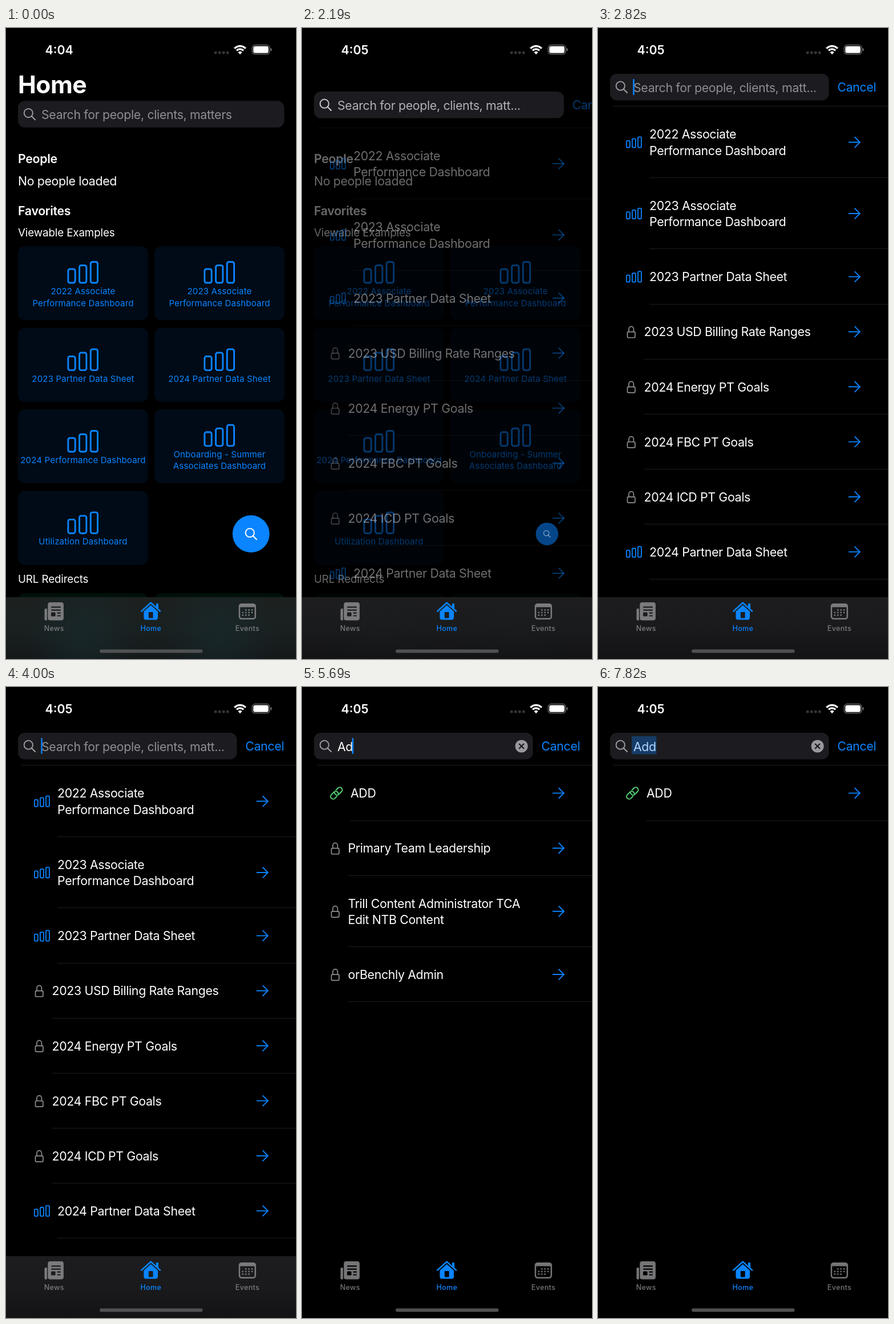
An HTML page with a canvas that plays this animation: 508 px wide and 1102 px high, repeating every 8000 ms.

```html
<!DOCTYPE html>
<html lang="en">
<head>
<meta charset="utf-8">
<title>Search</title>
<style>
html, body { margin: 0; width: 100%; height: 100%; overflow: hidden; background: #000; }
canvas { display: block; }
</style>
</head>
<body>
<canvas id="stage" width="508" height="1102"></canvas>
<script>
const ctx = document.getElementById('stage').getContext('2d');
const W = 508, H = 1102, LOOP = 8000, BAR_TOP = 994;
const BLUE = '#0a84ff', GRAY = '#8e8e93', WHITE = '#fff', GREEN = '#5bd77a';

// weight, size, letter spacing
const FONT = {
  title: [700, 42.6, -0.5],
  head: [600, 21.3, -0.3],
  clock: [600, 21.3, 0],
  body: [400, 21.3, -0.33],
  sub: [400, 18.8, -0.13],
  card: [400, 15.05, 0.15],
  tab: [500, 12.5, 0.35]
};

const CARDS = [
  ['2022 Associate', 'Performance Dashboard'], ['2023 Associate', 'Performance Dashboard'],
  ['2023 Partner Data Sheet'], ['2024 Partner Data Sheet'],
  ['2024 Performance Dashboard'], ['Onboarding - Summer', 'Associates Dashboard'],
  ['Utilization Dashboard']
];

const ROWS = [
  ['bars', '2022 Associate', 'Performance Dashboard'],
  ['bars', '2023 Associate', 'Performance Dashboard'],
  ['bars', '2023 Partner Data Sheet'],
  ['lock', '2023 USD Billing Rate Ranges'],
  ['lock', '2024 Energy PT Goals'],
  ['lock', '2024 FBC PT Goals'],
  ['lock', '2024 ICD PT Goals'],
  ['bars', '2024 Partner Data Sheet'],
  ['link', 'ADD'],
  ['lock', 'Primary Team Leadership'],
  ['lock', 'Trill Content Administrator TCA', 'Edit NTB Content'],
  ['lock', 'orBenchly Admin']
];
const TEXT_X = { bars: 90, lock: 80.5, link: 85 };

const clamp = v => Math.max(0, Math.min(1, v));
const ramp = (t, a, b) => clamp((t - a) / (b - a));

function setFont(style) {
  const [weight, size, spacing] = FONT[style];
  ctx.font = `${weight} ${size}px Inter, "Liberation Sans", sans-serif`;
  ctx.letterSpacing = spacing + 'px';
  return size;
}

// y is the middle of the capitals
function text(str, x, y, style, color = WHITE, align = 'left') {
  const size = setFont(style);
  ctx.textAlign = align;
  ctx.fillStyle = color;
  ctx.fillText(str, x, y + size * 0.364);
}

function widthOf(str, style) {
  setFont(style);
  return ctx.measureText(str).width;
}

function box(x, y, w, h, r, color) {
  ctx.fillStyle = color;
  ctx.beginPath();
  ctx.roundRect(x, y, w, h, r);
  ctx.fill();
}

function frame(x, y, w, h, r, color, lw) {
  ctx.strokeStyle = color;
  ctx.lineWidth = lw;
  ctx.beginPath();
  ctx.roundRect(x, y, w, h, r);
  ctx.stroke();
}

function disc(x, y, r, color) {
  ctx.fillStyle = color;
  ctx.beginPath();
  ctx.arc(x, y, r, 0, 7);
  ctx.fill();
}

function line(points, color, lw) {
  ctx.strokeStyle = color;
  ctx.lineWidth = lw;
  ctx.lineCap = ctx.lineJoin = 'round';
  ctx.beginPath();
  points.forEach(([x, y]) => ctx.lineTo(x, y));
  ctx.stroke();
}

function layer(alpha, draw) {
  if (alpha <= 0) return;
  ctx.save();
  ctx.globalAlpha *= alpha;
  draw();
  ctx.restore();
}

function magnifier(x, y, s, color, lw) {
  ctx.strokeStyle = color;
  ctx.lineWidth = lw;
  ctx.beginPath();
  ctx.arc(x - 2 * s, y - 2 * s, 7.6 * s, 0, 7);
  ctx.stroke();
  line([[x + 3.5 * s, y + 3.5 * s], [x + 9.7 * s, y + 9.7 * s]], color, lw * 1.1);
}

function bars(x, bottom, s, lw) {
  [27, 33.5, 39.5].forEach((h, i) => {
    const half = lw / 2;
    frame(x + i * 19.7 * s + half, bottom - h * s + half, 15.2 * s - lw, h * s - lw, 3.2 * s, BLUE, lw);
  });
}

function lock(y) {
  frame(51.5, y - 0.5, 13.4, 10.2, 2, GRAY, 1.7);
  ctx.beginPath();
  ctx.moveTo(54, y - 0.5);
  ctx.lineTo(54, y - 5.5);
  ctx.arc(58.2, y - 5.5, 4.2, Math.PI, 0);
  ctx.lineTo(62.4, y - 0.5);
  ctx.stroke();
}

function link(y) {
  ctx.save();
  ctx.translate(60.3, y);
  ctx.rotate(-Math.PI / 4);
  ctx.lineCap = 'round';
  [0, Math.PI].forEach(turn => {
    ctx.rotate(turn);
    ctx.strokeStyle = GREEN;
    ctx.lineWidth = 1.9;
    ctx.beginPath();
    ctx.moveTo(3.2, -4.4);
    ctx.lineTo(8.2, -4.4);
    ctx.arc(8.2, 0, 4.4, -Math.PI / 2, Math.PI / 2);
    ctx.lineTo(1.6, 4.4);
    ctx.arc(1.6, 0, 4.4, Math.PI / 2, Math.PI * 1.25);
    ctx.stroke();
  });
  ctx.restore();
}

function arrow(y) {
  line([[439.5, y], [458.5, y]], BLUE, 1.9);
  line([[450, y - 8.8], [458.8, y], [450, y + 8.8]], BLUE, 1.9);
}

function statusBar(t) {
  text(t < 500 ? '4:04' : '4:05', 68.5, 38, 'clock');
  for (let i = 0; i < 4; i++) box(364.7 + i * 7, 40.8, 4.8, 4.8, 1.6, '#343436');
  ctx.strokeStyle = WHITE;
  ctx.lineCap = 'butt';
  ctx.lineWidth = 3.3;
  [13.6, 8.4].forEach(r => {
    ctx.beginPath();
    ctx.arc(410, 45.2, r, -Math.PI * 0.755, -Math.PI * 0.245);
    ctx.stroke();
  });
  ctx.fillStyle = WHITE;
  ctx.beginPath();
  ctx.moveTo(410, 46.2);
  ctx.arc(410, 45.8, 5, -Math.PI * 0.755, -Math.PI * 0.245);
  ctx.fill();
  frame(431.2, 29.7, 30.6, 16, 5, '#727274', 1.3);
  box(433.2, 31.7, 26.6, 12, 3.2, WHITE);
  box(463.4, 35.2, 2, 5.4, 1, '#727274');
}

function home() {
  text('People', 21, 228, 'head');
  text('No people loaded', 21, 267, 'body');
  text('Favorites', 21, 319.5, 'head');
  text('Viewable Examples', 21, 357, 'sub');
  CARDS.forEach((lines, i) => {
    const x = i % 2 ? 260 : 21, y = 381.3 + (i >> 1) * 142.4;
    const two = lines.length > 1;
    box(x, y, 227.8, 129, 12, '#000b17');
    bars(x + 86.4, y + (two ? 65.2 : 75.4), 1, 2.9);
    lines.forEach((s, n) => text(s, x + 114, y + (two ? 78.2 : 88.4) + n * 20.6, 'card', BLUE, 'center'));
  });
  text('URL Redirects', 21, 962.5, 'sub');
  box(21, 987, 227.8, 60, 12, '#00100a');
  box(260, 987, 227.8, 60, 12, '#00100a');
}

function results(query, dy) {
  const rows = query.length < 2 ? ROWS
    : ROWS.filter(r => r.slice(1).join(' ').toLowerCase().includes(query.toLowerCase()));
  let y = 136.9 + dy;
  const divider = x => {
    ctx.fillStyle = '#1d1d1f';
    ctx.fillRect(x, Math.floor(y), W - x, 1);
  };
  divider(26);
  for (const [icon, ...lines] of rows) {
    if (y > BAR_TOP) break;
    const h = lines.length > 1 ? 124.5 : 96.1, mid = y + h / 2 + 0.4;
    if (icon === 'bars') bars(49, mid + 10.1, 0.51, 1.8);
    if (icon === 'lock') lock(mid + 0.6);
    if (icon === 'link') link(mid + 0.1);
    lines.forEach((s, n) => text(s, TEXT_X[icon], y + 48.7 + n * 28.5, 'body'));
    arrow(mid);
    y += h;
    divider(TEXT_X[icon]);
  }
}

function cursorAlpha(t) {
  if (t < 2820) return 0;
  const start = t < 5690 ? 2500 : t < 6190 ? 5690 : 6190;
  const u = (t - start) % 1000;
  return u < 870 ? 1 - ramp(u, 490, 640) : ramp(u, 870, 1000);
}

function searchField(t, p, query) {
  const y = 127.3 - 47.3 * p, w = 466.3 - 82.8 * p, mid = y + 23.2;
  const moving = p > 0 && p < 0.95;
  const tone = moving ? '#b2b2b6' : GRAY;
  box(21, y, w, 46.5, 12, '#1c1b1f');
  magnifier(41.3, mid, 1, moving ? '#c8c8cc' : '#98989d', 2);
  if (!query) {
    text('Search for people, clients, matt' + (p > 0 ? '...' : 'ers'), 62, mid + 0.6, 'body', tone);
  } else {
    text(query, 62, mid + 0.6, 'body');
    disc(384.5, 103.4, 11, '#98989e');
    line([[380.6, 99.5], [388.4, 107.3]], '#161618', 2);
    line([[388.4, 99.5], [380.6, 107.3]], '#161618', 2);
  }
  const end = 62 + (query ? widthOf(query, 'body') : 0);
  if (t >= 6440) {
    ctx.fillStyle = 'rgba(10,132,255,0.32)';
    ctx.fillRect(59, 86, end - 58.5, 31.5);
  }
  layer(cursorAlpha(t), () => box(query ? end - 1.4 : 61.2, 89, 2.6, 28, 1.3, BLUE));
  layer(clamp(p * 1.25), () => text('Cancel', 21 + w + 14.7, y + 22.8, 'body', BLUE));
}

function floatingButton(t, p) {
  const s = 1 - p * 1.14;
  if (s <= 0) return;
  const alpha = t < 2070 ? 1 : 0.43 + p * 0.3;
  layer(alpha, () => {
    disc(429.2, 883.5, 32.4 * s, BLUE);
    magnifier(429.2, 883.5, s, WHITE, 2 * s);
  });
}

function barFill(stops) {
  const g = ctx.createLinearGradient(0, BAR_TOP, 0, H);
  stops.forEach((c, i) => g.addColorStop(i / (stops.length - 1), c));
  ctx.fillStyle = g;
  ctx.fillRect(0, BAR_TOP, W, H - BAR_TOP);
}

function barGlow(x) {
  const g = ctx.createRadialGradient(x, 1062, 0, x, 1062, 105);
  g.addColorStop(0, 'rgba(24,42,46,0.7)');
  g.addColorStop(1, 'rgba(24,42,46,0)');
  ctx.fillStyle = g;
  ctx.fillRect(0, BAR_TOP, W, H - BAR_TOP);
}

function tabBar(t, p) {
  const cleared = t >= 5630;
  const idle = cleared ? '#757577' : '#7b7b7e', hole = cleared ? '#000' : '#1a1c1d';
  barFill(['#000', '#000']);
  layer(1 - ramp(t, 5540, 5680), () => {
    barFill(['#1c2120', '#1a2020', '#141819']);
    barGlow(135);
    barGlow(374);
    layer(clamp(p * 2.6), () => barFill(['#1d1d1f', '#1a1a1c', '#131315']));
  });

  box(73.3, 1003, 27.6, 31.6, 4, idle);
  box(67.5, 1014, 4.4, 20.6, [2, 0, 0, 2.2], idle);
  [1010.2, 1015.6].forEach(y => box(79, y, 17, 2.2, 1, hole));
  box(79, 1020.6, 7.6, 7, 1.4, hole);
  [1020.6, 1025.4].forEach(y => box(89.4, y, 6.6, 2.2, 1, hole));
  text('News', 84.3, 1048.5, 'tab', idle, 'center');

  line([[237.3, 1018.5], [253.7, 1003.8], [270, 1018.5]], BLUE, 2.6);
  box(263, 1005, 4, 9, 1, BLUE);
  ctx.fillStyle = BLUE;
  ctx.beginPath();
  [[253.7, 1008], [266, 1019], [266, 1031], [264, 1033.4], [243.4, 1033.4], [241.4, 1031], [241.4, 1019]]
    .forEach(([x, y]) => ctx.lineTo(x, y));
  ctx.fill();
  box(249.8, 1020, 7.8, 10.4, 1, hole);
  text('Home', 253.9, 1048.5, 'tab', BLUE, 'center');

  frame(408.9, 1006.2, 27.8, 25.6, 4, idle, 2.5);
  box(408, 1005.4, 29.6, 6, [4, 4, 0, 0], idle);
  for (let row = 0; row < 3; row++)
    for (let col = 0; col < 4; col++)
      if (!(row === 0 && col === 0) && !(row === 2 && col === 3))
        disc(414.8 + col * 5.4, 1016.4 + row * 4.5, 1.35, idle);
  text('Events', 423, 1048.5, 'tab', idle, 'center');

  box(164, 1085.3, 180.5, 6, 3, '#4f5051');
}

// critically damped spring from home screen to search
function openProgress(t) {
  if (t < 2100) return 0;
  if (t >= 2630) return 1;
  const k = (t - 2100) * 0.0134;
  return 1 - (1 + k) * Math.exp(-k);
}

function typed(t) {
  return t < 4820 ? '' : t < 5630 ? 'A' : t < 6190 ? 'Ad' : 'Add';
}

function draw(t) {
  const p = openProgress(t), query = typed(t);
  ctx.fillStyle = '#000';
  ctx.fillRect(0, 0, W, H);
  layer(1 - p * 1.7, home);
  layer(1 - p * 2.9, () => text('Home', 21, 98.5, 'title'));
  if (t >= 2070) layer(1 - p * 8, () => text('Cancel', 420, 98.5, 'body', BLUE));
  layer(clamp(p * 1.25), () => results(query, 57 * (1 - p)));
  searchField(t, p, query);
  floatingButton(t, p);
  tabBar(t, p);
  statusBar(t);
}

const begin = performance.now();
function tick() {
  draw((performance.now() - begin) % LOOP);
  requestAnimationFrame(tick);
}
tick();
</script>
</body>
</html>
```
